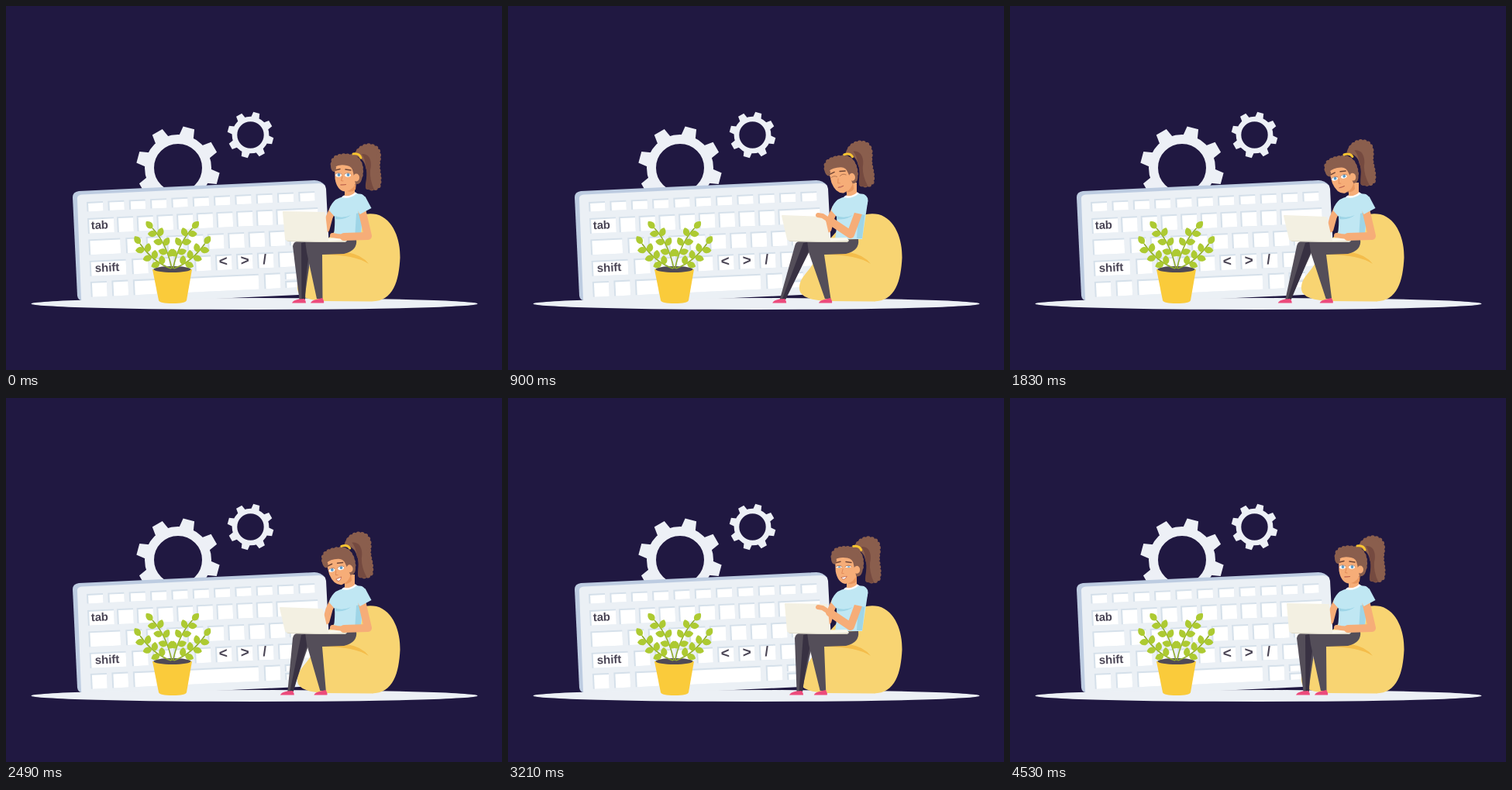
Recreate the animation shown at these times as an HTML page. Size 640 px wide and 470 px high, loop 4560 ms.

```html
<!DOCTYPE html>
<html lang="en">
<head>
<meta charset="utf-8">
<title>Working on a laptop</title>
<style>
html, body { margin: 0; width: 100%; height: 100%; overflow: hidden; background: #201841; }
svg { display: block; width: 100vw; height: 100vh; }
text { font-family: "Liberation Sans", Arial, sans-serif; font-weight: bold; fill: #4a4555; }
.skin { fill: #f6ad78; }
.hair { fill: #8a5e4d; }
.curl { fill: none; stroke: #8a5e4d; stroke-width: 6; stroke-linecap: round; stroke-dasharray: 0 5; }
.line { fill: none; stroke-linecap: round; stroke-linejoin: round; }
.arm { stroke: #f6ad78; }
.pants { fill: #544e59; }
.shirt { fill: #c0e7f3; }
</style>
</head>
<body>
<svg viewBox="0 0 640 470">
  <g id="gears" fill="#edf0f6"></g>

  <path fill="#bdcce1" d="M86 247Q86 240 94 239L398 225Q406 225 412 232L405 300L100 380Q93 381 92 374Z"/>
  <path fill="#ebf0f5" d="M92 250Q91 244 98 243.5L404 229Q412 229 413 236L420 371L103 386Q98 386 97 378Z"/>
  <g id="keys" transform="translate(104 253) rotate(-2.7)"></g>
  <ellipse cx="320.5" cy="384.5" rx="288" ry="7.5" fill="#ecf0f5"/>

  <path fill="#facb3b" d="M189 340H240L233 380Q232 384 215 384Q198 384 197 380Z"/>
  <ellipse cx="214.5" cy="340" rx="24" ry="4" fill="#504a55"/>
  <g id="plant"></g>

  <path fill="#f8d472" d="M376 362C378 346 393 342 400 318L425 290L458 270Q468 267 478 269C500 275 509 302 508.500 325C507 355 500 381 472 381.500L412 381C394 380 374 377 376 362Z"/>
  <path fill="#f4bd4b" d="M409 318H440Q459 321 468 333Q450 321 409 321Z"/>

  <path id="farLeg" class="pants"/>
  <path id="farShade" fill="#383142"/>
  <path id="nearLeg" class="pants"/>
  <path id="farShoe" fill="#ec4b7c" d="M369 383.500Q370 380 378 378.500L385 378Q387 381 387 383.500Z"/>
  <path id="nearShoe" fill="#ec4b7c" d="M393 383.500Q394 380 402 378.500L408 377Q411 381 410 383.500Z"/>

  <path class="line arm" stroke-width="9" d="M422 262L417 273L413 288"/>
  <path class="shirt" d="M417 264Q420 249 436 246L450 241Q460 243 464 254L457 301H422Q425 284 424 272Z"/>
  <path fill="#9ed5e7" d="M424 271Q434 275 445 270Q436 277 424 275ZM452 268L461 265L457 300H450Z"/>
  <path fill="#fff" d="M433 247Q443 250 453 242L450 240L435 245Z"/>

  <g id="tail">
    <path class="hair" d="M449 193C452 183 461 178 470 180C482 181 483 192 481 202C479 212 484 222 479 234Q473 239 466 235C463 227 468 218 464 208C463 201 459 196 449 193Z"/>
    <path class="curl" d="M455 187C460 181 467 179 472 181C482 183 482 193 480 203C479 212 484 223 480 234Q473 237 467 234"/>
    <path fill="#754a40" d="M459 191C472 190 472 206 470 212Q469 224 475 237Q468 239 464 235C463 227 468 218 464 208Q464 198 459 191Z"/>
  </g>
  <path class="skin" d="M437 228H450V241Q445 246 437 245Z"/>
  <g id="head">
    <path class="skin" d="M424 203L424.500 223Q427 238 437 239.500Q450 237 453 224L454 203Z"/>
    <path fill="#e8965f" d="M440 239Q448 237 452 228L451 237Q447 241 440 239Z"/>
    <g id="eyes">
      <g fill="#fff"><ellipse cx="429" cy="218" rx="4" ry="2.700"/><ellipse cx="441" cy="218" rx="4" ry="2.700"/></g>
      <g fill="#5a9ac9"><circle cx="429.500" cy="218" r="1.900"/><circle cx="441.500" cy="218" r="1.900"/></g>
    </g>
    <path class="line" stroke="#a86c4c" stroke-width=".8" d="M425 217Q429 214 433 217M437 217Q441 214 445 217"/>
    <path class="line" stroke="#704637" stroke-width="1.500" d="M425 212L431 210.500M438 211L445 212"/>
    <path class="line" stroke="#e08a58" stroke-width="1" d="M434 220L432.500 225.500L435 226"/>
    <path id="mouth" fill="#fff" stroke="#bd6149" stroke-width=".8" stroke-linejoin="round"/>
    <path class="hair" d="M424 214C418 214 418 203 421 199C425 191 440 190 450 193C460 197 463 210 459 224Q457 231 451 230L448 215Q447 207 440 206Q430 204 424 208Z"/>
    <path class="curl" d="M423 209C420 203 422 198 427 195C435 192 446 193 452 197C459 203 459 214 457 222"/>
    <ellipse class="skin" cx="452" cy="221.500" rx="4" ry="5"/>
    <path class="line" stroke="#fbc531" stroke-width="3" d="M448 191Q456 190 458 196"/>
  </g>

  <path fill="#faf8ed" d="M360 301L437 299L440 303Q437 305 414 305L364 304Z"/>
  <path fill="#dedac8" d="M361 302.500L414 304L440 303L438 305H414L364 304Z"/>
  <path id="screen" fill="#f3f0e2" stroke="#f3f0e2" stroke-width="2" stroke-linejoin="round"/>
  <path id="arm" class="line arm" stroke-width="10"/>
  <path id="hand" class="line arm" stroke-width="6"/>
  <path id="sleeve" class="line" stroke="#c0e7f3" stroke-width="17" style="stroke-linecap:butt"/>
  <circle class="shirt" cx="456" cy="251" r="8.500"/>
</svg>
<script>
const $ = id => document.getElementById(id);
const range = n => [...Array(n).keys()];

// Static parts
function gear(x, y, scale) {
  const teeth = range(8).map(i =>
    `<path d="M-9.500 -41L-7.500 -53.500H7.500L9.500 -41Z" transform="rotate(${15 + 45 * i})"/>`).join('');
  return `<g transform="translate(${x} ${y}) scale(${scale})">${teeth}
    <circle r="37" fill="none" stroke="#edf0f6" stroke-width="12"/></g>`;
}
$('gears').innerHTML = gear(222, 209, 1) + gear(315.5, 166.5, .555);

const key = (x, y, w = 21, h = 20) =>
  `<rect x="${x}" y="${y}" width="${w}" height="${h}" fill="#d5e0ea"/>
   <rect x="${x + 2}" y="${y + 2}" width="${w - 2}" height="${h - 2}" fill="#fff"/>`;
const label = (x, y, size, text) => `<text x="${x}" y="${y}" font-size="${size}">${text}</text>`;
$('keys').innerHTML = [
  ...range(11).map(i => key(27.35 * i, 0, 21, 12.5)),
  key(0, 21, 34), ...range(8).map(i => key(38 + 25.7 * i, 21)), key(243.5, 21, 54),
  key(0, 48.5, 41), ...range(8).map(i => key(48 + 26.4 * i, 48.5)), key(259, 48.5, 39),
  key(0, 76, 47), ...range(7).map(i => key(54.5 + 27 * i, 76)), key(243.5, 76, 54),
  key(0, 103), key(27.5, 103), key(55, 103, 30), key(91, 103, 126), key(224, 103),
  key(251, 103, 21, 9), key(251, 114, 21, 9),
  label(4.3, 35.5, 14.8, 'tab'), label(6.7, 91, 15, 'shift'),
  label(167, 91, 19, '&lt;'), label(195, 91, 19, '&gt;'), label(223.5, 91, 18, '/')
].join('');

function stem(x0, y0, x1, y1, x2, y2) {
  const quad = (a, b, c, u) => (1 - u) ** 2 * a + 2 * u * (1 - u) * b + u * u * c;
  const leaf = (u, turn) => {
    const dx = (1 - u) * (x1 - x0) + u * (x2 - x1), dy = (1 - u) * (y1 - y0) + u * (y2 - y1);
    const angle = Math.atan2(dy, dx) * 180 / Math.PI + turn;
    return `<path fill="#adca32" d="M0 0C3 -6 9 -5 12 0C9 5 3 6 0 0"
      transform="translate(${quad(x0, x1, x2, u)} ${quad(y0, y1, y2, u)}) rotate(${angle})"/>`;
  };
  return `<path d="M${x0} ${y0}Q${x1} ${y1} ${x2} ${y2}" fill="none" stroke="#8fac2c" stroke-width="1.6"/>` +
    [.25, .5, .75].map(u => leaf(u, 55) + leaf(u + .08, -55)).join('') + leaf(1, 0);
}
const half = stem(213, 339, 190, 331, 173, 307) + stem(214, 339, 207, 306, 189, 287);
$('plant').innerHTML = half + `<g transform="translate(429.500 0) scale(-1 1)">${half}</g>`;

// Eased value at time t through [time, value] pairs
function track(t, ...keys) {
  const next = keys.findIndex(k => k[0] > t);
  if (next < 0) return keys[keys.length - 1][1];
  if (next === 0) return keys[0][1];
  const [t0, a] = keys[next - 1], [t1, b] = keys[next];
  return a + (b - a) * (1 - Math.cos(Math.PI * (t - t0) / (t1 - t0))) / 2;
}
const poseTimes = [0, 900, 1830, 2490, 3210, 3900, 4500];
const pose = (t, ...values) => track(t, ...values.map((v, i) => [poseTimes[i], v]));
const mix = (a, b, u) => a + (b - a) * u;
const move = (id, x, y, turn = '') => $(id).setAttribute('transform', `translate(${x} ${y}) ${turn}`);
const path = (id, d) => $(id).setAttribute('d', d);

function draw(t) {
  // Legs stretch out, then slide slowly back
  const stretch = track(t, [0, 0], [950, 1], [4200, 0]);
  const farX = -28 * stretch, nearX = 8 * stretch;
  move('farShoe', farX, 0);
  move('nearShoe', nearX, 0);
  path('farLeg', `M370 310Q371 303 380 303H396L${385 + farX} 379H${378.5 + farX}Z`);
  path('farShade', `M381 306L394 303Q${387 + farX / 4} 335 ${386 + farX} 379H${381.5 + farX}Z`);
  path('nearLeg', `M386 303L452 301Q454 316 436 320L408 321L${408.5 + nearX} 378H${401 + nearX}L388 318Z`);

  const tilt = pose(t, 0, -12, -14, -13, -1, -6, 0);
  move('head', pose(t, 0, -4, -5, -4, -1.5, -1.5, 0), pose(t, 0, 1, 1, .5, .5, -.5, 0), `rotate(${tilt} 442 240)`);
  move('tail', pose(t, 0, -13, -14, -12, -3, -5, 0), pose(t, 0, -4, -5.5, -5, 1, -3.5, 0), `rotate(${tilt * .3} 470 200)`);

  const blink = track(t, [700, 0], [800, 1], [1050, 1], [1150, 0], [3080, 0], [3190, .6], [3230, .6], [3340, 0]);
  $('eyes').setAttribute('transform', `translate(0 ${217 * blink}) scale(1 ${1 - blink})`);
  const smile = pose(t, 0, .2, .1, 1, .8, .9, 0);
  path('mouth', `M431.500 231Q435 ${231 + 7 * smile} 439 ${230.5 - smile}Z`);

  const lean = track(t, [0, 0], [800, 1], [2500, 1], [3150, 0]);
  path('screen', `M${358 - 4 * lean} ${266 + 5 * lean}L${411 - 3 * lean} ${267 + 6 * lean}L415 303L361 301Z`);

  // Near arm: typing at 0, hand lifted at 1
  const lift = track(t, [350, 0], [750, 1], [1150, 1], [1600, 0], [2650, 0], [3050, 1], [3350, 1], [3900, .3], [4300, 0]);
  const elbowX = mix(467, 442, lift * lift), elbowY = mix(297, 295, lift);
  const handX = mix(425, 404, lift), handY = mix(297, 271, lift);
  const wristX = handX + 11, wristY = handY + 1 + 5 * lift;
  path('arm', `M457 254L${elbowX} ${elbowY}L${wristX} ${wristY}`);
  path('hand', `M${wristX} ${wristY}L${handX + 2} ${handY}L${handX - 4} ${handY - 1}`);
  path('sleeve', `M456 250L${mix(464, 452, lift)} ${mix(265, 268, lift)}`);
}

function frame(now) {
  draw(now % 4560);
  requestAnimationFrame(frame);
}
draw(0);
requestAnimationFrame(frame);
</script>
</body>
</html>
```
